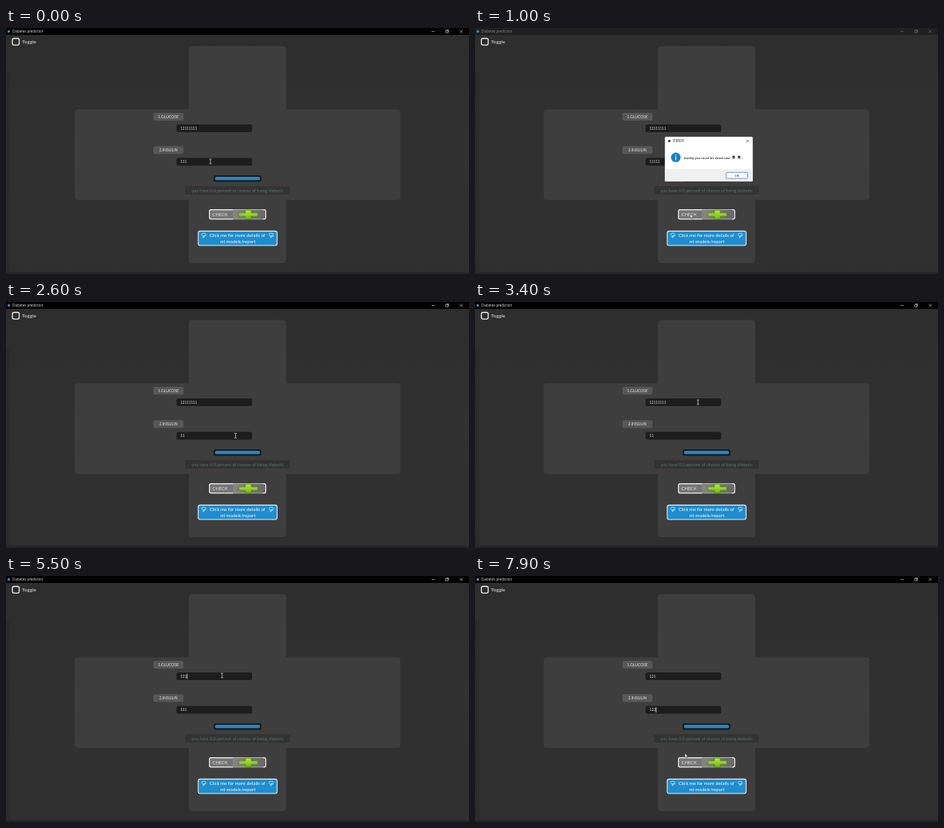
Recreate the animation shown at these times as an HTML page. Size 600 by 319 pixels, loop 8 s.

```html
<!DOCTYPE html>
<html lang="en">
<head>
<meta charset="utf-8">
<title>Diabetes prediction</title>
<style>
  html, body { margin: 0; width: 100%; height: 100%; overflow: hidden; background: #2f2f2f; }
  svg { display: block; width: 600px; height: 319px; }
  text { font-family: Lato, "Open Sans", sans-serif; fill: #e4e4e4; white-space: pre; }
  .ui { font-family: "Open Sans", "Noto Sans", sans-serif; }
  .mid { text-anchor: middle; }
  .panel { fill: #3e3e3e; }
  .label { fill: #575757; }
  .entry { fill: #1d1d1d; }
  .value { font-size: 4.7px; fill: #dedede; }
  .line { fill: none; stroke: #ddd; stroke-width: .6; }
  .dim .bar { fill: #202020; }
  .dim text { fill: #8a8a8a; }
  .dim .line { stroke: #777; }
</style>
</head>
<body>
<svg viewBox="0 0 600 319">
  <defs>
    <linearGradient id="back" x2="0" y2="1">
      <stop offset="0" stop-color="#2d2d2d"/>
      <stop offset=".5" stop-color="#313131"/>
      <stop offset="1" stop-color="#2f2f2f"/>
    </linearGradient>
    <linearGradient id="green" x2="0" y2="1">
      <stop offset="0" stop-color="#b5ea3a"/>
      <stop offset="1" stop-color="#72b80e"/>
    </linearGradient>
    <linearGradient id="steel">
      <stop offset="0" stop-color="#858585"/>
      <stop offset=".5" stop-color="#747474"/>
      <stop offset="1" stop-color="#686868"/>
    </linearGradient>
    <path id="hand" d="M-2.4 -1.6Q-2.4 -2.8 -1 -2.8H1.4Q2.6 -2.8 2.6 -1.4V.2Q2.6 1 1.6 1H.3V2.4Q.3 3 -.3 3T-.9 2.4V.7L-2 .3Q-2.6 0 -2.4 -1.6ZM.3 1V-.3M1.5 1V-.3"
      fill="none" stroke="#fff" stroke-width=".6"/>
  </defs>

  <rect width="600" height="319" fill="url(#back)"/>
  <rect y="58" width="5" height="258" fill="#2b2b2b"/>
  <rect y="316.5" width="600" height="2.5" fill="#202629"/>

  <g id="head">
    <rect class="bar" width="600" height="9"/>
    <circle cx="3.6" cy="4.4" r="1.6" fill="#3b93cf"/>
    <text class="ui" x="8.3" y="6.1" font-size="4.4">Diabetes prediction</text>
    <path class="line" d="M551.5 4.5h4M569.8 3.4h2.8v2.8h-2.8zM570.8 3.3v-.8h2.8v2.8h-.8M588 2.6l3.8 3.8M591.8 2.6l-3.8 3.8"/>
  </g>

  <rect x="8.3" y="13.5" width="8.8" height="8.6" rx="2" fill="#2b2b2b" stroke="#f0f0f0" stroke-width="1.3"/>
  <text x="20.8" y="20.3" font-size="6.5">Toggle</text>

  <rect class="panel" x="237" y="23.5" width="126" height="281.5" rx="4"/>
  <rect class="panel" x="89" y="105.5" width="422" height="117.5" rx="4"/>

  <rect class="label" x="191" y="110" width="39" height="10" rx="2"/>
  <text class="mid" x="210.5" y="117" font-size="5.1">1.GLUCOSE</text>
  <rect class="label" x="191" y="153.3" width="39" height="10" rx="2"/>
  <text class="mid" x="210.5" y="160.3" font-size="5.1">2.INSULIN</text>

  <rect class="entry" x="221" y="125" width="98" height="10" rx="2.5"/>
  <text class="value" id="glucose" x="226" y="131.8"></text>
  <rect class="entry" x="221" y="168.5" width="98" height="10" rx="2.5"/>
  <text class="value" id="insulin" x="226" y="175.3"></text>
  <rect id="caret" width=".8" height="6.6" fill="#f2f2f2"/>

  <rect x="269" y="191" width="62" height="8.4" rx="2.2" fill="#1c1c1c"/>
  <rect x="271" y="193.1" width="58" height="4.2" rx="1.6" fill="#2088cc"/>

  <rect x="232" y="205" width="136" height="11" rx="1.5" fill="#333"/>
  <text class="mid" x="300" y="212.5" font-size="5.65" style="fill:#55776b">you have 0.0 percent of chance of being diabetic</text>

  <rect x="263.6" y="235.6" width="73" height="12.2" rx="2" fill="#757575" stroke="#c4c4c4" stroke-width="1"/>
  <rect x="294" y="236" width="42.2" height="11.4" fill="url(#steel)"/>
  <path d="M294 235.6H265.6Q263.6 235.6 263.6 237.6V245.8Q263.6 247.8 265.6 247.8H294M333 235.6h1.6q2 0 2 2v8.2q0 2 -2 2h-1.6" fill="none" stroke="#f0f0f0" stroke-width="1.1"/>
  <text x="267.6" y="243.9" font-size="5.9">CHECK</text>
  <path d="M310.2 236.2h7.6v3.6h8.4v4.4h-8.4v3.4h-7.6v-3.4h-8.4v-4.4h8.4z" fill="url(#green)" stroke="#4d7d14" stroke-width=".6"/>

  <rect x="249.1" y="263.4" width="102.2" height="18.6" rx="2.4" fill="#1f8dce" stroke="#eee" stroke-width="1.1"/>
  <use href="#hand" x="256.3" y="269"/>
  <use href="#hand" x="343.6" y="269"/>
  <g font-size="6">
    <text class="mid" x="299.8" y="271" style="fill:#fff">Click me for more details of</text>
    <text class="mid" x="300.5" y="279" style="fill:#fff">ml models/report</text>
  </g>

  <g id="dialog">
    <rect x="246" y="141" width="114" height="58" rx="1.5" fill="#fff" stroke="#777" stroke-width=".4"/>
    <path d="M246.2 183H359.8V197.5Q359.8 198.8 358.5 198.8H247.5Q246.2 198.8 246.2 197.5Z" fill="#f0f0f0"/>
    <circle cx="251.8" cy="146.6" r="1.6" fill="#333"/>
    <text class="ui" x="257" y="148.3" font-size="4.4" style="fill:#222">ERROR</text>
    <path d="M351.4 144.8l3.8 3.8M355.2 144.8l-3.8 3.8" stroke="#333" stroke-width=".6"/>
    <circle cx="260.2" cy="167.8" r="6.2" fill="#1480cf"/>
    <path d="M260.2 164v1.3M260.2 166.5v5" stroke="#fff" stroke-width="1.1"/>
    <text class="ui" x="271" y="169.6" font-size="4.2" font-weight="600" style="fill:#222">buddy you must be dead now</text>
    <g id="skulls" fill="#333">
      <path id="skull" d="M333.6 167.2a1.6 1.4 0 0 1 3.2 0l-.6 1h-2zM333.2 169.8l4 -1.2M333.2 168.6l4 1.2" stroke="#333" stroke-width=".4"/>
      <use href="#skull" x="7"/>
    </g>
    <text class="ui" x="344.6" y="169.6" font-size="4.2" font-weight="600" style="fill:#222">...</text>
    <rect x="325.3" y="187.3" width="28.2" height="7.8" rx=".8" fill="#fdfdfd" stroke="#3f6fb0" stroke-width=".7"/>
    <text class="ui mid" x="339.4" y="192.8" font-size="4.3" style="fill:#222">OK</text>
  </g>

  <g id="mouse">
    <path id="arrow" d="M0 0V5.4L1.3 4.3L2.2 6.2L3.1 5.8L2.2 3.9H3.8Z" fill="#fff" stroke="#111" stroke-width=".4"/>
    <path id="beam" d="M-1.5 -3H-.4L0 -2.6L.4 -3H1.5M0 -2.6V2.6M-1.5 3H-.4L0 2.6L.4 3H1.5" fill="none" stroke="#eee" stroke-width=".7"/>
  </g>
</svg>
<script>
  const LOOP = 8000, STEP = 100;
  const $ = id => document.getElementById(id);

  const mousePath = [
    [0, 265, 173], [300, 265, 173], [800, 279, 241.5], [1100, 279, 241.5],
    [1500, 346, 190], [1600, 346, 190], [1800, 352.5, 187], [2300, 300, 174],
    [2800, 296, 173], [3400, 289, 130], [3800, 288, 130], [4600, 280, 129],
    [5500, 280, 129], [6200, 240, 173], [6500, 238, 173], [7200, 239, 173],
    [7900, 272, 230]
  ];
  const glucose = [
    [0, "12111111"], [3900, "1211111"], [4000, "121111"],
    [4100, "12111"], [4200, "1211"], [4300, "121"]
  ];
  const insulin = [
    [0, "111"], [200, "1111"], [400, "11111"], [2400, "1111"], [2500, "111"],
    [2600, "11"], [3500, "111"], [6400, "11"], [6600, "1"], [6800, "12"], [7000, "122"]
  ];
  const focus = [[-700, "insulin"], [1000, null], [1800, "insulin"], [3700, "glucose"], [6100, "insulin"]];
  const dialogFade = [[0, 0], [1000, 1], [1600, .5], [1700, .15], [1800, .04], [2000, 0]];

  const last = (keys, t) => keys.filter(k => k[0] <= t).pop();

  function along(keys, t) {
    const a = last(keys, t);
    const b = keys[keys.indexOf(a) + 1];
    if (!b) return a.slice(1);
    const p = (t - a[0]) / (b[0] - a[0]);
    const e = p * p * (3 - 2 * p);
    return [1, 2].map(i => a[i] + (b[i] - a[i]) * e);
  }

  const show = (el, on) => el.setAttribute("visibility", on ? "visible" : "hidden");

  function drawCaret(t) {
    const [start, field] = last(focus, t);
    const on = field && (t - start) % 900 < 600;
    show($("caret"), on);
    if (!on) return;
    $("caret").setAttribute("x", 226.2 + $(field).getComputedTextLength());
    $("caret").setAttribute("y", field === "glucose" ? 126.8 : 170.3);
  }

  function drawMouse(t, modal) {
    const [x, y] = along(mousePath, t);
    const overEntry = x > 221 && x < 319 && (Math.abs(y - 130) < 5 || Math.abs(y - 173.5) < 5);
    $("mouse").setAttribute("transform", `translate(${x} ${y})`);
    show($("beam"), overEntry && !modal);
    show($("arrow"), !overEntry || modal);
  }

  function draw(t) {
    const modal = t >= 1000 && t < 1600;
    $("glucose").textContent = last(glucose, t)[1];
    $("insulin").textContent = last(insulin, t)[1];
    $("dialog").setAttribute("opacity", last(dialogFade, t)[1]);
    $("head").classList.toggle("dim", modal);
    drawCaret(t);
    drawMouse(t, modal);
  }

  const begin = performance.now();
  function tick() {
    const t = (performance.now() - begin) % LOOP;
    draw(Math.floor(t / STEP) * STEP);
    requestAnimationFrame(tick);
  }
  tick();
</script>
</body>
</html>
```
